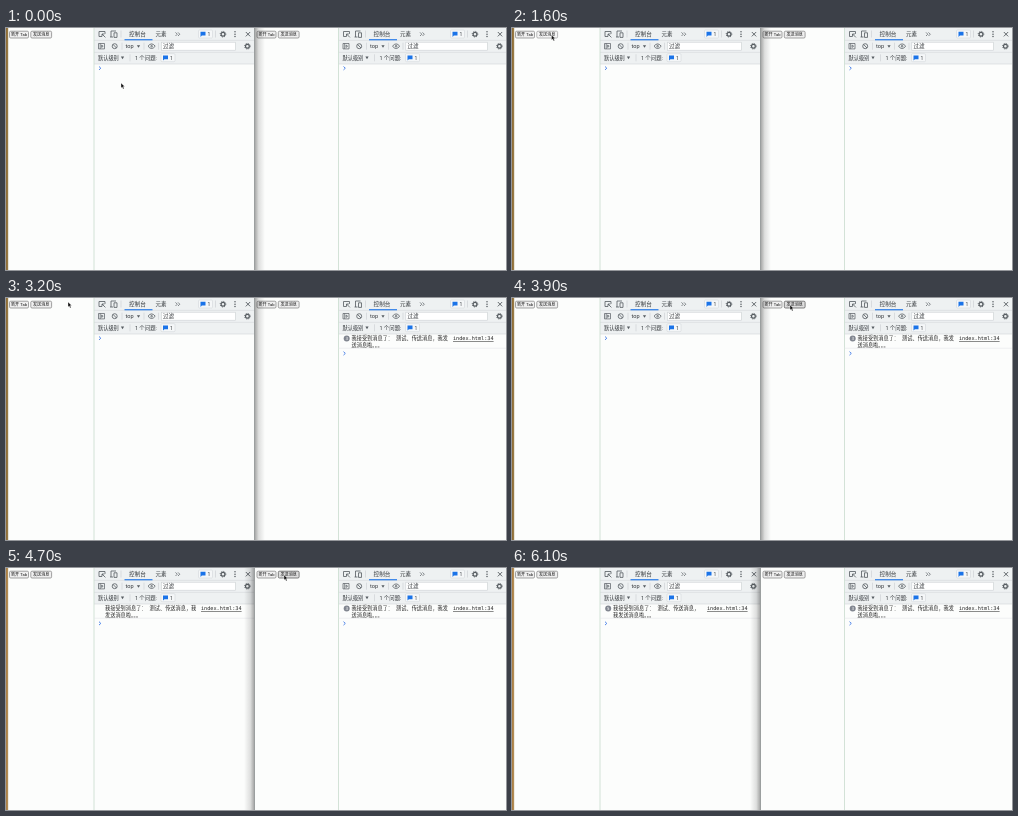
These frames come from a looping animation (500 by 242 pixels, 6800 ms). An HTML page:

```html
<!DOCTYPE html>
<html lang="zh-CN">
<head>
<meta charset="utf-8">
<style>
html, body { margin: 0; width: 100%; height: 100%; overflow: hidden; background: #fcfdfc; }
svg { display: block; width: 500px; height: 242px; }
text { font-family: Roboto, "Noto Sans CJK SC", "Noto Sans CJK", sans-serif; fill: #33373b; white-space: pre; }
.log text { font: 5.2px "DejaVu Sans Mono", "Noto Sans CJK SC", "Noto Sans CJK", monospace; fill: #222; }
</style>
</head>
<body>
<svg viewBox="0 0 500 242">
  <defs>
    <linearGradient id="toRight"><stop stop-color="#000" stop-opacity=".36"/><stop offset=".4" stop-color="#000" stop-opacity=".12"/><stop offset="1" stop-color="#000" stop-opacity="0"/></linearGradient>
    <linearGradient id="toLeft" x1="1" x2="0"><stop stop-color="#000" stop-opacity=".36"/><stop offset=".4" stop-color="#000" stop-opacity=".12"/><stop offset="1" stop-color="#000" stop-opacity="0"/></linearGradient>
  </defs>
  <g id="base"></g>
  <g id="live"></g>
</svg>
<script>
const LOOP = 6800, STEP = 100;
const LEFT = { x: 88, end: 248, page: 3.5 }, RIGHT = { x: 332.5, end: 500, page: 251 };
const INK = '#555b60', BLUE = '#1a73e8';

const rect = (x, y, w, h, fill, more = '') =>
  `<rect x="${x}" y="${y}" width="${w}" height="${h}" fill="${fill}" ${more}/>`;
const text = (x, y, s, size, more = '') =>
  `<text x="${x}" y="${y}" font-size="${size}" ${more}>${s}</text>`;
const line = (d, stroke = INK, width = .8, more = '') =>
  `<path d="${d}" fill="none" stroke="${stroke}" stroke-width="${width}" ${more}/>`;
const ring = (x, y, r, width = .8) =>
  `<circle cx="${x}" cy="${y}" r="${r}" fill="none" stroke="${INK}" stroke-width="${width}"/>`;
const separator = (x, y) => line(`M${x} ${y - 3.5}v7`, '#c9cdd0', .6);
const caret = (x, y) => `<path d="M${x - 1.6} ${y - 1.2}h3.2l-1.6 2.6z" fill="${INK}"/>`;
const gear = (x, y) => ring(x, y, 1.9, 1.2) +
  `<circle cx="${x}" cy="${y}" r="2.8" fill="none" stroke="${INK}" stroke-width=".9" stroke-dasharray="1.1 1.1"/>`;

function issueBadge(x, y) {
  return rect(x, y - 4, 14, 8, '#f5f7f8', 'stroke="#ccd0d4" stroke-width=".5" rx="1"') +
    `<path d="M${x + 2} ${y - 2.3}h5v3.8h-3.6l-1.4 1.4z" fill="${BLUE}"/>` +
    text(x + 9, y + 1.9, 1, 5);
}

function devtools({ x, end }) {
  const w = end - x;
  let s = rect(x, 0, w, 36, '#eef1f2');
  for (const y of [12.3, 24.3, 36]) s += line(`M${x} ${y}H${end}`, '#d0d5d7', .6);
  s += line(`M${x} 0V242`, '#cfdfd3', .9);

  // tab bar
  s += line(`M${x + 8} 8.5h-3v-5h6v2.4M${x + 8} 6l3.4 3.4M${x + 8} 8.4v-2.4h2.4`);
  s += line(`M${x + 17} 9v-6h5M${x + 16} 9h3M${x + 20} 4.8h3v4.6h-3z`);
  s += separator(x + 27, 6);
  s += text(x + 43.5, 8.1, '控制台', 5.6, 'text-anchor="middle"');
  s += rect(x + 30.5, 11.2, 28, 1.1, BLUE);
  s += text(x + 67, 8.1, '元素', 5.5, 'text-anchor="middle"');
  s += line(`M${x + 81.5} 4.4l1.8 1.8l-1.8 1.8m2.5 -3.6l1.8 1.8l-1.8 1.8`, INK, .7);
  s += issueBadge(end - 55.5, 6) + separator(end - 38.5, 6) + gear(end - 31, 6.2);
  for (const y of [3.8, 6.2, 8.6]) s += `<circle cx="${end - 19}" cy="${y}" r=".75" fill="${INK}"/>`;
  s += line(`M${end - 8.2} 4l4.4 4.4m0 -4.4l-4.4 4.4`, INK, .9);

  // filter bar
  s += line(`M${x + 4.5} 15.5h6v5.4h-6zM${x + 6.2} 15.5v5.4M${x + 7.6} 17l1.6 1.2l-1.6 1.2z`, INK, .7);
  s += ring(x + 20.7, 18.2, 2.5) + line(`M${x + 19} 16.4l3.5 3.6`);
  s += separator(x + 28, 18.2) + text(x + 31.5, 20, 'top', 5.6) + caret(x + 44.5, 18.4);
  s += line(`M${x + 54} 18.2q3.6 -4.6 7.2 0q-3.6 4.6 -7.2 0z`) + ring(x + 57.6, 18.2, .8);
  s += separator(x + 50, 18.2) + separator(x + 64.5, 18.2);
  s += rect(x + 67.3, 14.2, w - 86, 8, '#fff', 'stroke="#cbd0d3" stroke-width=".6"');
  s += text(x + 69, 20.3, '过滤', 5.5) + gear(end - 6.6, 18.2);

  // level bar
  s += text(x + 4, 31.5, '默认级别', 5.2) + caret(x + 28.5, 29.8) + separator(x + 36, 29.8);
  s += text(x + 41, 31.5, '1 个问题:', 5.4) + issueBadge(x + 67, 29.7);
  return s;
}

function button(x, w, label, state = 'idle') {
  const [fill, stroke] = { idle: ['#efefef', '#7c7c7c'], hover: ['#dedede', '#4c4c4c'], down: ['#f5f5f5', '#9a9a9a'] }[state];
  return rect(x, 3.2, w, 6.8, fill, `stroke="${stroke}" stroke-width=".7" rx="1.2"`) +
    text(x + w / 2, 8.1, label, 4.1, 'text-anchor="middle" style="fill:#111"');
}

// count 0: empty console, 1: plain message, more: message with repeat badge
function consoleLog({ x, end }, count, head, tail) {
  const y = count ? 55.4 : 40.2;
  let s = line(`M${x + 5} ${y - 1.7}l1.8 1.7l-1.8 1.7`, '#3b78e7', .9);
  if (!count) return s;
  const tx = x + (count > 1 ? 13 : 11);
  if (count > 1) s += `<circle cx="${x + 8.2}" cy="40.6" r="3" fill="#80858f"/>` +
    text(x + 8.2, 42.1, count, 4.2, 'text-anchor="middle" style="font-size:4.2px;fill:#fff"');
  s += text(tx, 42.3, '我接受到消息了： 测试、传送消息，' + head, 5.2);
  s += text(tx, 48.6, tail, 5.2);
  s += text(end - 53, 42.3, 'index.html:34', 5.2, 'text-decoration="underline"');
  return s + line(`M${x} 50.2H${end}`, '#e3e6e8', .6);
}

// pointer stops: time, x, y
const path = [
  [0, 115, 55], [100, 115.4, 55], [500, 115.4, 55], [800, 88, 38], [1100, 44, 9.3], [1200, 41, 7.6],
  [1300, 40, 7.2], [1400, 39.5, 7], [3100, 39.5, 7], [3200, 62, 4], [3300, 140, 3], [3400, 218, 10],
  [3500, 218, 10], [3900, 278, 7], [5900, 278, 7], [6000, 283, 8.5]
];
function pointerAt(t) {
  const i = path.findIndex(p => p[0] > t);
  if (i < 0) return path.at(-1).slice(1);
  const [a, b] = [path[i - 1], path[i]], k = (t - a[0]) / (b[0] - a[0]);
  return [a[1] + (b[1] - a[1]) * k, a[2] + (b[2] - a[2]) * k];
}

const presses = [1600, 2400, 2800, 5000, 5200, 5400, 5600];
const leftTimes = [4700, 5100, 5300, 5500, 5700], rightTimes = [1700, 2500, 2900];
const passed = (times, t) => times.filter(v => v <= t).length;

function live(t) {
  const rightFront = t >= 4000, visible = t < 6100;
  const [px, py] = pointerAt(t);
  const state = (x, w) => !visible || px < x || px > x + w || py > 10 ? 'idle' : presses.includes(t) ? 'down' : 'hover';
  const nl = passed(leftTimes, t), nr = passed(rightTimes, t);
  let s = rect(0, 0, 2, 242, rightFront ? '#ab8046' : '#8f6e38');
  s += line('M2.2 0V242', rightFront ? '#d9c8a9' : '#c5b592', .5);
  for (const { page } of [LEFT, RIGHT]) {
    s += button(page, 19, '新开 Tab');
    s += button(page + 21.3, 20.8, '发送消息', state(page + 21.3, 20.8));
  }
  s += '<g class="log">' +
    consoleLog(LEFT, nl, nl > 1 ? '' : '我', (nl > 1 ? '我' : '') + '发送消息啦。。。') +
    consoleLog(RIGHT, nr, '我发', '送消息啦。。。') + '</g>';
  s += rightFront ? rect(238, 0, 10.5, 242, 'url(#toLeft)') : rect(248.5, 0, 10.5, 242, 'url(#toRight)');
  s += line('M248.5 0V242', '#8f9394', .8);
  if (visible) s += `<path transform="translate(${px} ${py})" d="M0 0v5l1.2 -1l.9 2l1 -.5l-.9 -1.9h1.5z" fill="#111" stroke="#fff" stroke-width=".35"/>`;
  return s;
}

const baseLayer = document.getElementById('base'), liveLayer = document.getElementById('live');
baseLayer.innerHTML = rect(0, 0, 500, 242, '#fcfdfc') + devtools(LEFT) + devtools(RIGHT);
const start = performance.now();
let shown = -1;
function frame() {
  const t = Math.floor((performance.now() - start) % LOOP / STEP) * STEP;
  if (t !== shown) liveLayer.innerHTML = live(shown = t);
  requestAnimationFrame(frame);
}
frame();
</script>
</body>
</html>
```
